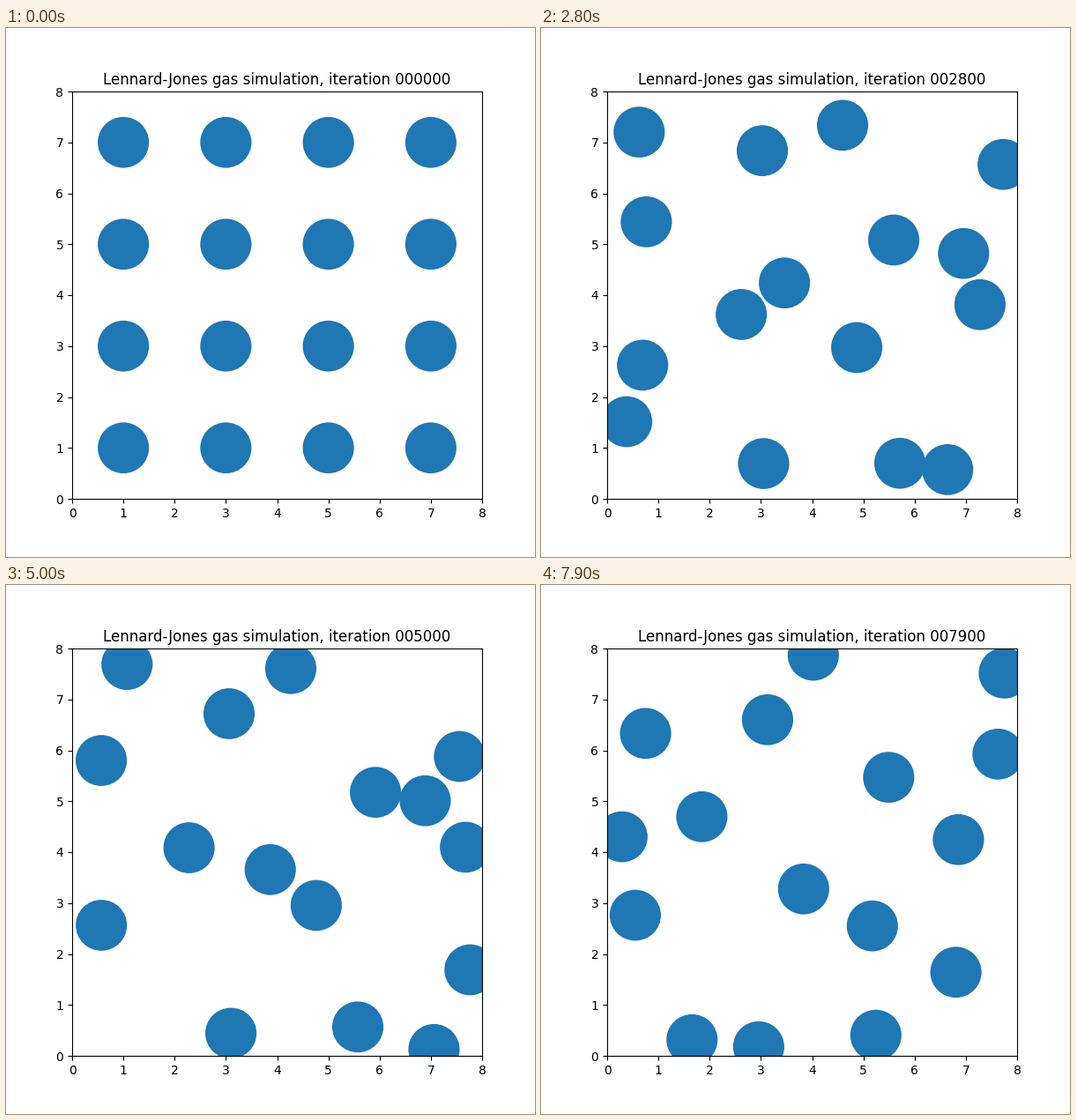
A matplotlib script for the animation above (8 s loop, 600x600 px).

```python
import matplotlib.pyplot as plt
import numpy as np
from matplotlib.animation import FuncAnimation
from matplotlib.patches import Circle

BOX = 8
FRAMES, INTERVAL = 80, 100
STEPS_PER_FRAME = 100
DT = 0.001
EPSILON = 0.004  # well depth; particle diameter and mass are 1

# Particles start on a 4 x 4 lattice, row by row from the bottom left.
lattice = np.array([(x, y) for y in range(1, BOX, 2) for x in range(1, BOX, 2)], float)
launch = np.array([
    (-0.221, 0.181), (0.019, -0.109), (0.253, -0.107), (-0.126, -0.152),
    (-0.109, -0.131), (-0.137, 0.218), (-0.046, -0.011), (0.098, 0.287),
    (-0.083, 0.156), (0.165, -0.268), (0.210, 0.030), (-0.015, -0.062),
    (-0.225, 0.034), (0.009, -0.059), (-0.144, 0.119), (0.351, -0.115),
])


def forces(pos):
    """Lennard-Jones forces between nearest periodic images."""
    d = pos[:, None] - pos
    d -= BOX * np.round(d / BOX)
    r2 = (d ** 2).sum(axis=2) + np.eye(len(pos))  # keep self-pairs finite
    s6 = r2 ** -3
    pull = 24 * EPSILON * (2 * s6 ** 2 - s6) / r2
    return (pull[..., None] * d).sum(axis=1)


def simulate():
    """Particle centres for every frame, by velocity Verlet."""
    pos, vel = lattice.copy(), launch.copy()
    force = forces(pos)
    path = []
    for _ in range(FRAMES):
        path.append(pos % BOX)
        for _ in range(STEPS_PER_FRAME):
            vel += force * DT / 2
            pos += vel * DT
            force = forces(pos)
            vel += force * DT / 2
    return path


path = simulate()

fig, ax = plt.subplots(figsize=(6, 6), dpi=100)
ax.set_xlim(0, BOX)
ax.set_ylim(0, BOX)
title = ax.set_title("")
discs = [ax.add_patch(Circle(p, 0.5)) for p in lattice]


def update(frame):
    for disc, centre in zip(discs, path[frame]):
        disc.center = centre
    title.set_text(f"Lennard-Jones gas simulation, iteration {frame * STEPS_PER_FRAME:06d}")
    return [*discs, title]


anim = FuncAnimation(fig, update, frames=FRAMES, interval=INTERVAL, repeat=True)
plt.show()
```
